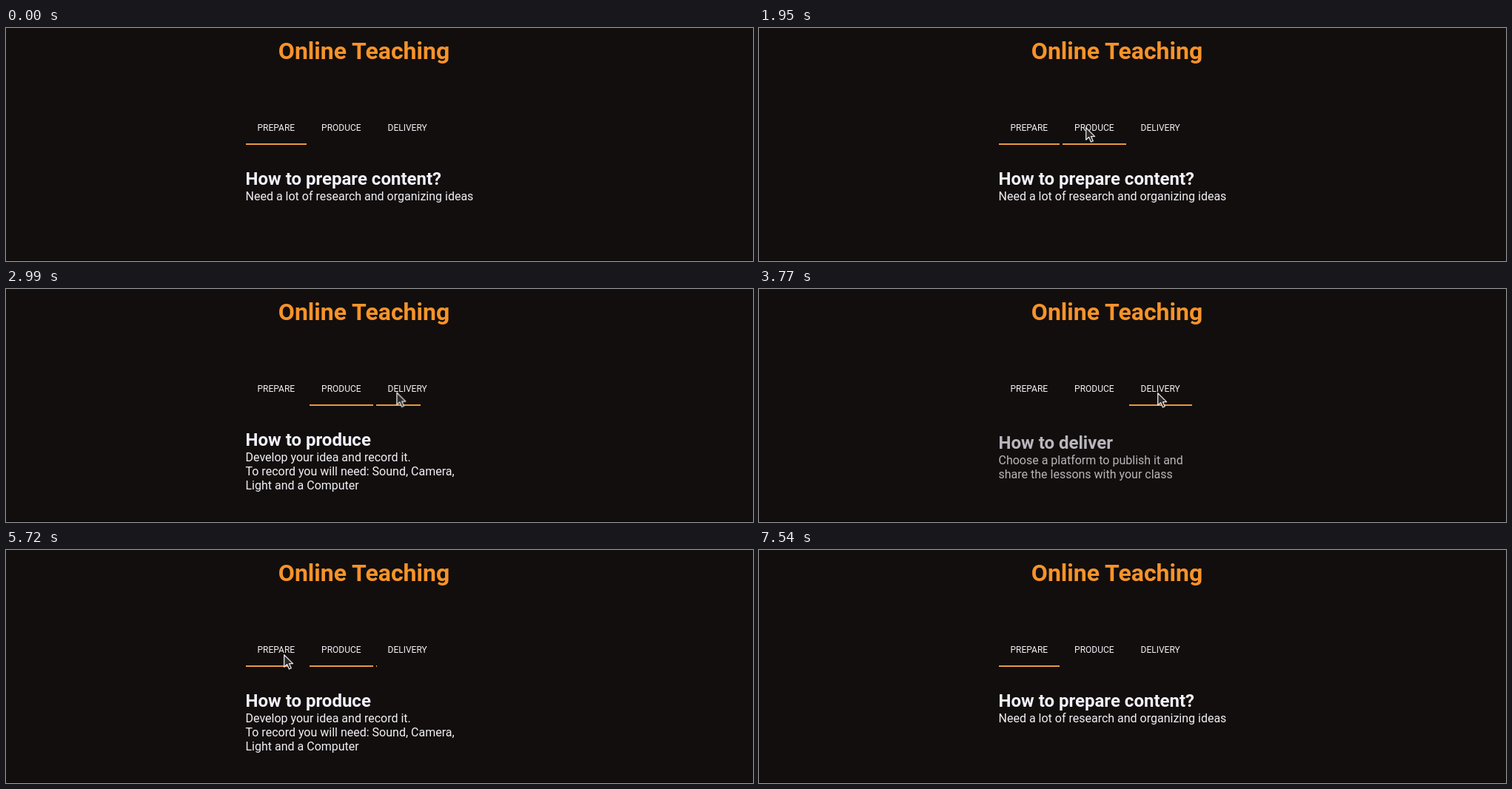
Write an HTML page that moves like this. It is 1009x315 px and loops after 7.67 s.

```html
<!DOCTYPE html>
<html lang="en">
<head>
<meta charset="utf-8">
<title>Online Teaching</title>
<style>
  html, body { margin: 0; width: 100%; height: 100%; overflow: hidden; background: #120e0d; }
  body { position: relative; font: 16px Roboto, sans-serif; color: #f1eff5; }
  h1, h2, p { margin: 0; line-height: normal; white-space: nowrap; }
  h1, nav, .pane, .line, #edge, #cursor { position: absolute; }
  h1, nav, .pane { left: 323.5px; width: 320px; }
  h1 { top: 12px; text-align: center; font-size: 32px; color: #f6932a; }
  h2 { font-size: 24px; color: #f3f1fb; }
  nav { top: 128px; white-space: nowrap; }
  .tab { display: inline-block; position: relative; padding: 0 16px; font-size: 12px; line-height: 14px; vertical-align: top; }
  .line { left: 0; top: 28px; height: 2px; background: #e8993f; }
  .pane { top: 190px; }
  #edge { left: 0; bottom: 0; width: 100%; height: 1px; background: #080505; }
  #cursor { left: -.5px; top: -.7px; overflow: visible; }
</style>
</head>
<body>
<h1>Online Teaching</h1>

<nav>
  <div class="tab">PREPARE<div class="line"></div></div>
  <div class="tab">PRODUCE<div class="line"></div></div>
  <div class="tab">DELIVERY<div class="line"></div></div>
</nav>

<div class="pane">
  <h2>How to prepare content?</h2>
  <p>Need a lot of research and organizing ideas</p>
</div>
<div class="pane">
  <h2>How to produce</h2>
  <p>Develop your idea and record it.<br>To record you will need: Sound, Camera,<br>Light and a Computer</p>
</div>
<div class="pane">
  <h2>How to deliver</h2>
  <p>Choose a platform to publish it and<br>share the lessons with your class</p>
</div>

<div id="edge"></div>
<svg id="cursor" width="16" height="24">
  <path d="M.7 .8V17.2L4.6 13.6L7.4 20L10.3 18.7L7.5 12.6H12.6Z"
        fill="#2b2829" stroke="#e6e4e6" stroke-width="1.3" stroke-linejoin="round"/>
</svg>

<script>
const LOOP = 7670, STEP = 130;
const HOVER = 200, FADE = 500, LAG = 40;
const anims = [];

// Each key is [time, style, easing]
function track(el, keys) {
  const frames = keys
    .filter(([t]) => t >= 0 && t <= LOOP)
    .map(([t, style, easing = 'linear']) => ({ ...style, offset: t / LOOP, easing }));
  const anim = el.animate(frames, { duration: LOOP, fill: 'both' });
  anim.pause();
  anims.push(anim);
}

const PREPARE = 0, PRODUCE = 1, DELIVERY = 2;
const clicks = [[PREPARE, -FADE], [PRODUCE, 2335], [DELIVERY, 3505], [PRODUCE, 4675], [PREPARE, 6343]];
const hovers = [[PRODUCE, 1280, 2700], [DELIVERY, 2906, 4420], [PRODUCE, 4450, 5100], [DELIVERY, 5200, 5550], [PREPARE, 5636, 7000]];

// Time each tab stays selected: [tab, from, to]
const active = clicks.map(([tab, t], i) => [tab, t, i + 1 < clicks.length ? clicks[i + 1][1] : LOOP + FADE]);

// A line is lit while its tab is selected or hovered
const litSpans = [...hovers, ...active.map(([tab, from, to]) => [tab, from + LAG, to + LAG])];
document.querySelectorAll('.line').forEach((el, tab) => {
  const spans = litSpans.filter(s => s[0] === tab);
  const lit = t => spans.some(([, from, to]) => from <= t && t < to);
  const style = on => ({ width: on ? '100%' : '0%' });
  const keys = [[0, style(lit(0))]];
  const times = spans.flatMap(([, from, to]) => [from, to]).sort((a, b) => a - b);
  for (const t of times.filter(t => lit(t) !== lit(t - 1)))
    keys.push([t, style(lit(t - 1)), 'ease'], [t + HOVER, style(lit(t))]);
  track(el, [...keys, [LOOP, style(lit(LOOP))]]);
});

// A selected pane fades in while rising
const shown = { opacity: 1, transform: 'none' };
const hidden = { opacity: 0, transform: 'translateY(15px)' };
document.querySelectorAll('.pane').forEach((el, tab) => {
  const spans = active.filter(s => s[0] === tab);
  const state = t => spans.some(([, from, to]) => from <= t && t < to) ? shown : hidden;
  const keys = spans.flatMap(([, from, to]) => [
    [from + LAG, hidden, 'ease'], [from + LAG + FADE, shown], [to, shown], [to, hidden]
  ]).filter(([t]) => t > 0 && t < LOOP);
  if (state(0) === shown) keys.shift();
  track(el, [[0, state(0)], ...keys, [LOOP, state(LOOP)]]);
});

// Pointer moves: start, end, x, y
const moves = [
  [520, 1300, 441, 135], [2700, 3100, 538, 141], [4400, 4680, 447, 142],
  [5070, 5330, 525, 141], [5460, 5720, 375, 142], [5850, 5980, 369, 142], [6890, 7280, 270, 340]
];
const at = (x, y) => ({ transform: `translate(${x}px, ${y}px)` });
let tip = at(290, 340);
const pointer = [[0, tip]];
for (const [start, end, x, y] of moves) {
  pointer.push([start, tip, 'ease-out']);
  tip = at(x, y);
  pointer.push([end, tip]);
}
track(document.querySelector('#cursor'), [...pointer, [LOOP, tip]]);

function draw() {
  const t = Math.floor((performance.now() % LOOP) / STEP) * STEP;
  for (const anim of anims) anim.currentTime = t;
  requestAnimationFrame(draw);
}
draw();
</script>
</body>
</html>
```
